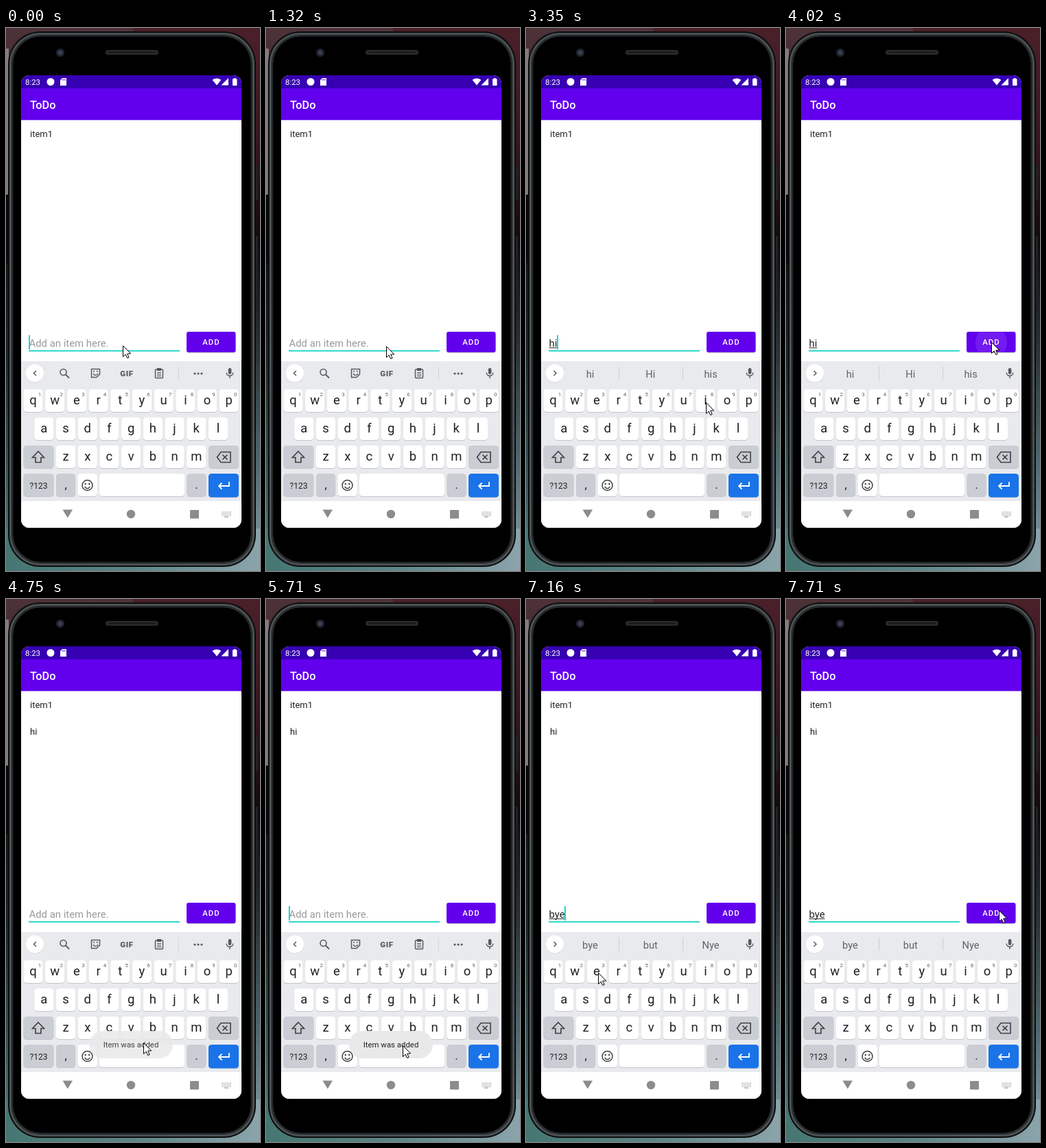
An HTML page with a canvas that plays this animation: 370x792 px, repeating every 8000 ms.

```html
<!DOCTYPE html>
<html lang="en">
<head>
<meta charset="utf-8">
<title>ToDo</title>
<style>
html, body { margin: 0; width: 100%; height: 100%; overflow: hidden; background: #000; }
canvas { display: block; width: 370px; height: 792px; }
</style>
</head>
<body>
<canvas id="stage" width="370" height="792"></canvas>
<script>
const g = document.getElementById('stage').getContext('2d');
const LOOP = 8000;
const TEAL = '#1cd6c8', PURPLE = '#6200ee', INK = '#202124', DARK = '#3c4043';
const ICON = '#565a5f', GREY = '#cacdd3';

const ROWS = ['qwertyuiop', 'asdfghjkl', 'zxcvbnm'];
const INDENT = [0, .5, 1.5];
const PITCH = 31.7;
const rowTop = r => 527 + 41 * r;

function keyCenter(c) {
  const r = ROWS.findIndex(row => row.includes(c));
  return [39.5 + (INDENT[r] + ROWS[r].indexOf(c)) * PITCH, rowTop(r) + 16.5];
}

function pointAt(c) {
  const [x, y] = keyCenter(c);
  return [x + 1, y + 2];
}

// Pointer moves: leave, arrive, destination
const REST = [170, 463];
const MOVES = [
  [0, 600, [175, 464]],
  [2000, 2600, [200, 618]],
  [2600, 2820, pointAt('h')],
  [2900, 3190, pointAt('i')],
  [3470, 3900, [299, 458]],
  [4330, 4800, [196, 655]],
  [5450, 6015, pointAt('b')],
  [6440, 6590, pointAt('y')],
  [6720, 7100, pointAt('e')],
  [7130, 7440, [331, 462]],
  [7440, 7710, [310, 454]]
];

// Typed text: time, value, suggestions
const TYPED = [
  [-245, '', []],
  [2890, 'h', ['h', 'he', 'how']],
  [3310, 'hi', ['hi', 'Hi', 'his']],
  [4230, '', []],
  [6250, 'b', ['b', 'but', 'best']],
  [6700, 'by', ['by', 'but', 'my']],
  [7100, 'bye', ['bye', 'but', 'Nye']]
];

const clamp = v => Math.max(0, Math.min(1, v));
const smooth = p => p * p * (3 - 2 * p);

// The screen refreshes in ticks, slightly faster after the idle start.
function sample(t) {
  const [from, step] = t < 2040 ? [0, 440 / 3] : [2060, 141.25];
  return from + Math.floor((t - from + 20) / step) * step;
}

function pointerAt(t) {
  return MOVES.reduce(([x, y], [leave, arrive, to]) => {
    const p = smooth(clamp((t - leave) / (arrive - leave)));
    return [x + (to[0] - x) * p, y + (to[1] - y) * p];
  }, REST).map(Math.round);
}

function rect(x, y, w, h, fill) {
  g.fillStyle = fill;
  g.fillRect(x, y, w, h);
}

function box(x, y, w, h, r, fill) {
  g.beginPath();
  g.roundRect(x, y, w, h, r);
  g.fillStyle = fill;
  g.fill();
}

function stroke(color, width) {
  g.strokeStyle = color;
  g.lineWidth = width;
  g.stroke();
}

function frame(x, y, w, h, r, color, width) {
  g.beginPath();
  g.roundRect(x, y, w, h, r);
  stroke(color, width);
}

function disc(x, y, r, fill) {
  g.beginPath();
  g.arc(x, y, r, 0, Math.PI * 2);
  g.fillStyle = fill;
  g.fill();
}

function ring(x, y, r, color, width, from = 0, to = Math.PI * 2) {
  g.beginPath();
  g.arc(x, y, r, from, to);
  stroke(color, width);
}

function trace(points, closed) {
  g.beginPath();
  for (let i = 0; i < points.length; i += 2) g.lineTo(points[i], points[i + 1]);
  if (closed) g.closePath();
}

function poly(points, fill) {
  trace(points, true);
  g.fillStyle = fill;
  g.fill();
}

function line(points, color, width, closed) {
  trace(points, closed);
  stroke(color, width);
}

// An arrowhead of half height s, pointing along dir (-1 left, 1 right)
function chevron(x, y, s, dir, color, width) {
  line([x, y - s, x + dir * s, y, x, y + s], color, width);
}

function text(s, x, y, size, color, align = 'left', weight = 400, spacing = 0) {
  g.font = `${weight} ${size}px Roboto, sans-serif`;
  g.letterSpacing = spacing + 'px';
  g.textAlign = align;
  g.fillStyle = color;
  g.fillText(s, x, y);
}

function gradient(x1, y1, colors) {
  const grad = g.createLinearGradient(0, 0, x1, y1);
  colors.forEach((c, i) => grad.addColorStop(i / (colors.length - 1), c));
  return grad;
}

function clipped(x, y, w, h, r, paint) {
  g.save();
  g.beginPath();
  g.roundRect(x, y, w, h, r);
  g.clip();
  paint();
  g.restore();
}

function phone() {
  rect(0, 0, 370, 792, gradient(0, 792, ['#4a2029', '#3a1720', '#100a0d', '#2c3538', '#4f6a70', '#8ba4ab']));
  rect(0, 0, 185, 792, gradient(0, 792, ['#4d3238', '#3a2428', '#101113', '#1c2526', '#33524f', '#4f8380']));
  rect(0, 730, 370, 62, gradient(370, 0, ['#467672', '#5c8585', '#8ba4ab']));
  rect(0, 30, 4, 213, '#857a7c');
  rect(0, 243, 4, 100, '#08080a');
  box(361, 200, 6, 51, 2, '#202326');
  box(361, 303, 6, 102, 2, '#202326');

  box(3, 5, 361, 781, 47, '#0c0d0e');
  frame(6.5, 8.5, 354, 774, 44, '#4b5153', 3);
  frame(9.5, 11.5, 348, 768, 41, '#2b2f31', 2);
  box(10.5, 12.5, 346, 766, 40, '#000');

  disc(79, 36, 6, '#22252e');
  disc(79, 36, 3, '#3a4058');
  box(145, 32, 77, 7, 3.5, '#2a2b2c');
  box(148, 34, 71, 3, 1.5, '#1c1d1e');
}

function statusBar() {
  rect(22, 69, 321, 19, '#3700b3');
  text('8:23', 28, 83, 11.4, '#fff');
  disc(65, 78.5, 5.5, '#fff');
  poly([82, 73, 88, 73, 88, 84, 79, 84, 79, 76], '#fff');
  for (let x = 82; x < 88; x += 2) rect(x - .4, 74.5, 1, 2, '#3700b3');
  g.beginPath();
  g.moveTo(307, 83.5);
  g.arc(307, 83.5, 10, -Math.PI * .72, -Math.PI * .28);
  g.fillStyle = '#fff';
  g.fill();
  poly([324, 73, 324, 83.5, 313.5, 83.5], '#fff');
  box(330, 74, 6.5, 10, 1, '#fff');
  rect(332, 73, 2.5, 2, '#fff');
}

function button(t) {
  const shape = [263, 443, 71.5, 30, 3];
  box(263, 444, 71.5, 30, 3, 'rgba(0,0,0,.22)');
  box(...shape, PURPLE);
  const age = t - 3896;
  if (age > 0 && age < 570) clipped(...shape, () => {
    g.globalAlpha = .1 * clamp((570 - age) / 250);
    disc(299, 459, Math.min(45, 23 * age / 141), '#fff');
  });
  text('ADD', 299, 462, 11.4, '#fff', 'center', 500, 1);
}

function app(t, since, value) {
  rect(22, 88, 321, 46.3, PURPLE);
  text('ToDo', 35, 118, 16.3, '#fff', 'left', 500);
  const items = t < 4230 ? ['item1'] : ['item1', 'hi'];
  items.forEach((s, i) => text(s, 35, 159 + 39 * i, 13, '#212121'));

  rect(33, 470, 220, 1.8, TEAL);
  text(value || 'Add an item here.', 33.5, 465, 14.9, value ? '#212121' : '#9a9a9a');
  const width = g.measureText(value).width;
  if (value) rect(33.5, 466, width, 1, '#333');
  if ((t - since) % 1000 < 500) rect(33 + Math.round(width), 448, 2, 21, TEAL);
  button(t);
}

function mic() {
  box(323.8, 496, 4.6, 9, 2.3, ICON);
  ring(326, 502.5, 4.8, ICON, 1.4, 0, Math.PI);
  line([326, 507, 326, 511], ICON, 1.4);
}

function face(x, y, r, color) {
  disc(x - r * .36, y - r * .27, r * .16, color);
  disc(x + r * .36, y - r * .27, r * .16, color);
  ring(x, y + r * .07, r * .53, color, 1.4, .3, Math.PI - .3);
}

function tools() {
  chevron(44, 503.5, 3.5, -1, ICON, 1.5);
  ring(83.5, 502, 4.5, ICON, 1.6);
  line([87, 505.5, 92, 510.5], ICON, 1.8);
  line([136.5, 505, 136.5, 497.5, 124.5, 497.5, 124.5, 509.5, 132, 509.5], ICON, 1.5, true);
  face(130.5, 502.5, 6.5, ICON);
  text('GIF', 176, 507.5, 11.5, ICON, 'center', 900, .6);
  frame(217.5, 498, 11, 12.5, 1, ICON, 1.5);
  rect(220, 496, 6, 4, ICON);
  for (let y = 502; y < 508; y += 2.5) rect(220, y, 6, 1.1, ICON);
  rect(251, 494, 1, 19, '#d3d6da');
  for (let i = -1; i < 2; i++) disc(280 + 5 * i, 504, 1.6, ICON);
}

function suggestions(words) {
  chevron(40.5, 503.5, 3.5, 1, ICON, 1.5);
  words.forEach((w, i) => {
    text(w, 93.5 + i * 87.8, 509.5, 14.7, '#5f6368', 'center');
    if (i) rect(42 + i * 93, 494, 1, 19, '#cbced3');
  });
}

function key(x, y, w, fill = '#fff', label = '', size = 18.5) {
  box(x, y + 1, w, 33, 4.5, '#c3c6ca');
  box(x, y, w, 33, 4.5, fill);
  text(label, x + w / 2, y + 22, size, INK, 'center');
}

function letters() {
  ROWS.forEach((row, r) => [...row].forEach((c, i) => {
    const x = keyCenter(c)[0], y = rowTop(r);
    key(x - 14.1, y, 28.2, '#fff', c);
    if (r === 0) text((i + 1) % 10, x + 9.5, y + 9.5, 8, '#5f6368', 'center');
  }));
}

function keyboard(words) {
  rect(22, 486, 321, 204, '#e8eaed');
  disc(42, 504.5, 13, '#d5d8db');
  disc(42, 503.5, 13, '#fff');
  words.length ? suggestions(words) : tools();
  mic();
  letters();

  const third = rowTop(2), last = rowTop(3);
  key(25.5, third, 44, GREY);
  line([47, 617.5, 55.5, 626.5, 51, 626.5, 51, 633.5, 43, 633.5, 43, 626.5, 38.5, 626.5], DARK, 1.6, true);
  key(295, third, 44, GREY);
  line([307.5, 626, 313, 618.5, 327, 618.5, 327, 633.5, 313, 633.5], DARK, 1.6, true);
  for (const s of [-3.5, 3.5]) line([315.5, 626 - s, 322.5, 626 + s], DARK, 1.6);

  key(25.5, last, 44, GREY, '?123', 12);
  key(73, last, 28.2, GREY, ',', 17);
  key(104.7, last, 28.2);
  ring(118.5, 667, 7.5, DARK, 1.5);
  face(118.5, 667, 7.5, DARK);
  key(136, last, 124);
  key(263.5, last, 28, GREY, '.', 17);
  key(295, last + 1, 44, '#1a73e8');
  box(295, last, 44, 34.5, 4.5, '#1a73e8');
  line([325, 662, 325, 668, 310.5, 668], '#fff', 1.8);
  chevron(314.5, 668, 4.5, -1, '#fff', 1.8);
}

function navBar() {
  const grey = '#8c8c8c';
  rect(22, 690, 321, 39, '#fff');
  poly([82.5, 702.5, 97, 702.5, 89.8, 714.5], grey);
  disc(182, 709, 6.2, grey);
  box(268, 703, 13, 12.5, 1, grey);
  for (let i = 0; i < 18; i++)
    rect(314.5 + i % 6 * 2.4, 705.5 + Math.floor(i / 6) * 2.4, 1.3, 1.3, '#9a9a9a');
  rect(318, 712.5, 6, 1.2, '#9a9a9a');
}

function toast(t) {
  g.save();
  g.globalAlpha = Math.min(clamp((t - 4600) / 170), clamp((6430 - t) / 200));
  box(121, 630, 122, 40, 20, '#e9e9ea');
  text('Item was added', 182, 654, 11.4, '#222', 'center');
  g.restore();
}

function pointer(x, y) {
  g.save();
  g.translate(x + .5, y + .5);
  const arrow = [0, 0, 0, 16, 3.7, 12.6, 6.2, 18, 8.6, 17, 6.2, 11.6, 11.2, 11.4];
  poly(arrow, '#fff');
  stroke('#000', 1);
  g.restore();
}

function draw(time) {
  const t = sample(time);
  const [since, value, words] = TYPED.filter(e => e[0] <= t).pop();
  phone();
  clipped(22, 69, 321, 660, 12, () => {
    rect(22, 69, 321, 660, '#fff');
    statusBar();
    app(t, since, value);
    keyboard(words);
    navBar();
    toast(t);
  });
  pointer(...pointerAt(t));
}

const origin = performance.now();
function tick() {
  draw((performance.now() - origin) % LOOP);
  requestAnimationFrame(tick);
}
tick();
</script>
</body>
</html>
```
